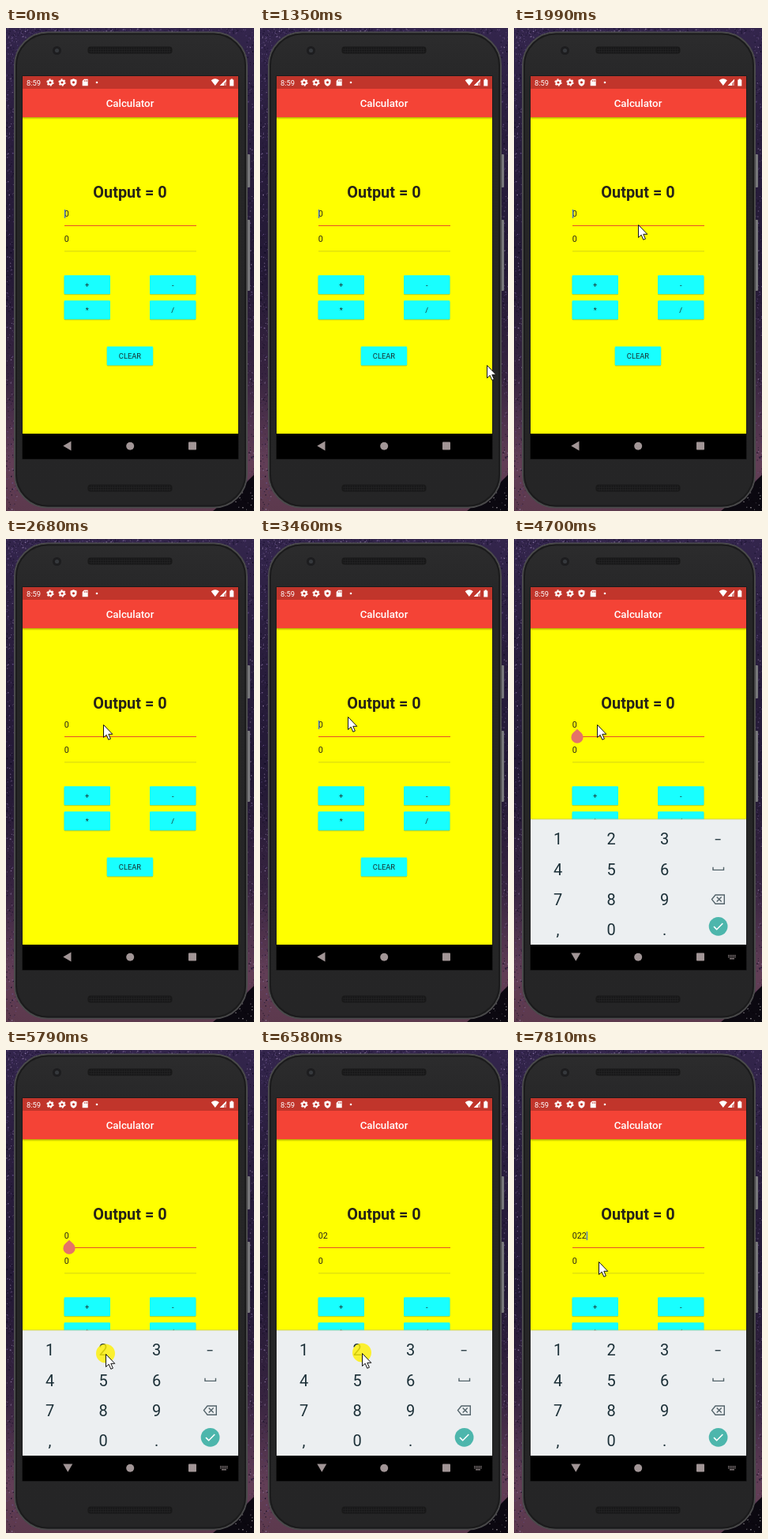
An HTML page that plays this animation: 314x612 px, repeating every 8000 ms.

```html
<!DOCTYPE html>
<html lang="en">
<head>
<meta charset="utf-8">
<title>Calculator</title>
<style>
  html, body { margin: 0; width: 100%; height: 100%; overflow: hidden; background: #241a33; }
  svg { display: block; width: 314px; height: 612px; font-family: Roboto, Arial, sans-serif; }
</style>
</head>
<body>
<svg id="stage" viewBox="0 0 314 612" xmlns="http://www.w3.org/2000/svg"></svg>
<script>
const LOOP = 8000;
const stage = document.getElementById('stage');

let seed = 11;
const random = () => (seed = (seed * 16807) % 2147483647) / 2147483647;

const rect = (x, y, w, h, fill, extra = '') =>
  `<rect x="${x}" y="${y}" width="${w}" height="${h}" fill="${fill}" ${extra}/>`;
const circle = (x, y, r, fill, extra = '') =>
  `<circle cx="${x}" cy="${y}" r="${r}" fill="${fill}" ${extra}/>`;
const path = (d, fill, extra = '') => `<path d="${d}" fill="${fill}" ${extra}/>`;
const line = (d, color, width) => path(d, 'none', `stroke="${color}" stroke-width="${width}"`);
const label = (text, x, y, size, fill, extra = '') =>
  `<text x="${x}" y="${y}" font-size="${size}" fill="${fill}" ${extra}>${text}</text>`;
const centered = 'text-anchor="middle"';

const gradient = (id, stops) =>
  `<linearGradient id="${id}" x1="0" y1="0" x2="0" y2="1">${stops
    .map(([offset, color, opacity = 1]) =>
      `<stop offset="${offset}" stop-color="${color}" stop-opacity="${opacity}"/>`).join('')}</linearGradient>`;

function specks(count, x, y, w, h, tints) {
  let out = '';
  for (let i = 0; i < count; i++) {
    const size = (0.6 + random() * 0.9).toFixed(1);
    out += rect((x + random() * w).toFixed(1), (y + random() * h).toFixed(1), size, size,
      tints[i % tints.length], `opacity="${(0.25 + random() * 0.6).toFixed(2)}"`);
  }
  return out;
}

function sky() {
  const tints = ['#6b5590', '#0e0920', '#9a86ad', '#120c26', '#4a3768'];
  return rect(0, 0, 314, 612, 'url(#sky)') +
    specks(650, 0, 0, 14, 612, tints) + specks(450, 303, 0, 11, 612, tints) +
    specks(350, 14, 0, 289, 7, tints) + specks(150, 0, 0, 45, 40, tints) +
    path('M314 566L300 580 262 612H314Z', '#0b0810') +
    specks(45, 290, 578, 24, 34, ['#d8d2d8', '#0b0810']);
}

function speaker(y) {
  return rect(103.5, y, 107, 9, '#191919', 'rx="3.5"') +
    rect(105, y + 1, 104, 7, 'url(#mesh)', 'rx="3"');
}

function phone() {
  return rect(305, 160, 4, 42, '#77777a', 'rx="1"') +
    rect(305, 243, 4, 90, '#77777a', 'rx="1"') +
    rect(11, 5.5, 294, 602, 'url(#body)', 'rx="42" stroke="#4a4a4b" stroke-width="2"') +
    rect(13, 7.5, 290, 598, 'none', 'rx="40" stroke="#1b1b1c" stroke-width="2"') +
    circle(64.5, 28.5, 5.5, '#1d1d1f') +
    circle(64.5, 28.5, 2.6, '#35383c') +
    speaker(23.5) + speaker(578.5);
}

function gear(x) {
  return circle(x, 69, 2.6, 'none', 'stroke="#fff" stroke-width="2"') +
    circle(x, 69, 4, 'none', 'stroke="#fff" stroke-width="1.3" stroke-dasharray="2.1 2.09"');
}

function statusBar() {
  return rect(21, 61, 273, 16, '#c1352b') +
    label('8:59', 26, 72.6, 9.3, '#fff') +
    gear(56) + gear(71) +
    path('M85.5 64.3l4 1.5v3q0 3.5-4 5q-4-1.5-4-5v-3z', '#fff') +
    circle(85.5, 68.8, 1.6, '#c1352b') +
    path('M99 64.7h4.7v8.6h-7v-6.3z', '#fff') +
    line('M99.3 66v2M101 66v2M102.6 66v2', '#c1352b', 0.7) +
    circle(115, 69, 1.3, '#fff') +
    path('M259.7 66.3q5.1-4 10.2 0l-5.1 6.8z', '#fff') +
    path('M279 64.8v8.3h-8.3z', '#fff', 'fill-opacity=".4"') +
    path('M279 64.8v2.5l-3 3v2.8h-5.3z', '#fff') +
    path('M283.3 65.5h1.4v-1h2.2v1h1.4v8h-5z', '#fff');
}

function button(text, x, y) {
  return rect(x, y + 1, 58.5, 24, '#77811a', 'rx="1.5" opacity=".4"') +
    rect(x, y, 58.5, 24, '#18ffff', 'rx="1.3"') +
    label(text, x + 29.2, y + 15.4, 9.3, '#172a2a', centered);
}

function app() {
  return rect(21, 77, 273, 437, '#ff0') +
    rect(21, 113, 273, 3, 'url(#shade)') +
    rect(21, 77, 273, 36, '#f44336') +
    label('Calculator', 157, 100.3, 13.3, '#fff', `${centered} font-weight="500"`) +
    statusBar() +
    label('Output = 0', 157, 215.3, 19.9, '#262318', `${centered} font-weight="700"`) +
    label('0', 73.8, 239, 10.7, '#262318', 'id="entry"') +
    rect(74, 250, 167, 1, '#e4502a') +
    label('0', 73.8, 271, 10.7, '#262318') +
    rect(74, 282.5, 167, 0.8, '#c9c91a') +
    button('+', 73.5, 313.3) + button('-', 182, 313.3) +
    button('*', 73.5, 345.2) + button('/', 182, 345.2) +
    button('CLEAR', 127.7, 403.5) +
    rect(0, 230, 1.2, 11, '#3566e0', 'id="caret"') +
    path('M80 240.8l5.4 5a7.6 7.6 0 1 1-10.8 0z', '#e57368', 'id="handle"');
}

function keyboard() {
  const ink = '#1c3038';
  const rows = ['123−', '456', '789', ',0.'];
  const keys = rows.map((row, r) => [...row].map((key, c) =>
    label(key, 55.5 + c * 67.6, 387.2 + r * 38.3, key === '−' ? 17 : 20, ink, centered)).join('')).join('');
  return `<g clip-path="url(#screen)"><g id="keyboard">` +
    rect(21, 354.6, 273, 1, '#b9bd80') +
    rect(21, 355.4, 273, 159, '#eceff1') + keys +
    line('M252 415.8v3.6h13.5v-3.6', '#53636a', 1.4) +
    line('M255 451h11.3v11.2H255l-4.5-5.6z', '#53636a', 1.4) +
    line('M256.7 453.6l6 6m0-6l-6 6', '#53636a', 1.4) +
    circle(258.6, 490.8, 11.9, '#4db6ac') +
    line('M253 491l3.7 3.7 7.6-7.7', '#fff', 1.6) +
    `</g></g>`;
}

function navBar() {
  const gray = '#a19596';
  let dots = '';
  for (let i = 0; i < 10; i++) {
    dots += rect(271 + (i % 5) * 2.1, 527 + Math.floor(i / 5) * 2, 1.3, 1.2, gray);
  }
  return rect(21, 514, 273, 32, '#000') +
    path('M72.3 529.6l10.2-6v12z', gray, 'id="back"') +
    `<g id="dismiss">${path('M72.3 524.5h12l-6 10.2z', gray)}${dots}${rect(273, 531.2, 6, 1.2, gray)}</g>` +
    circle(157.2, 529.7, 5, gray) +
    rect(231, 524.5, 10, 10, gray, 'rx=".8"');
}

stage.innerHTML = `<defs>` +
  gradient('sky', [[0, '#33254c'], [0.2, '#2a1e3e'], [0.5, '#231935'], [0.72, '#372440'], [0.9, '#623e56'], [1, '#5c394d']]) +
  gradient('body', [[0, '#2c2c2d'], [0.12, '#262627'], [1, '#252526']]) +
  gradient('shade', [[0, '#5a4a00', 0.45], [1, '#5a4a00', 0]]) +
  `<pattern id="mesh" width="3" height="3" patternUnits="userSpaceOnUse">${rect(0, 0, 3, 3, '#1f1f20')}${circle(1.5, 1.5, 1, '#141415')}</pattern>` +
  `<clipPath id="screen">${rect(21, 61, 273, 453, '#fff')}</clipPath></defs>` +
  sky() + phone() + rect(20.5, 60.5, 274, 486, '#111') + app() + keyboard() + navBar() +
  circle(0, 0, 12, '#fff000', 'id="halo" fill-opacity=".8"') +
  path('M0 0V16L3.7 12.7 6.3 18.8 8.9 17.7 6.3 11.8H11.3Z', '#fff',
    'id="pointer" stroke="#111" stroke-width="1" stroke-linejoin="round"');

const part = Object.fromEntries([...stage.querySelectorAll('[id]')].map(el => [el.id, el]));

// Pointer tip: time, x, y
const route = [
  [70, 268, 481], [110, 287, 427], [1040, 287, 427], [1350, 287, 427], [1440, 281, 402], [1670, 243, 303],
  [1840, 243, 303], [1990, 157, 249], [2220, 157, 249], [2450, 139, 191], [2680, 123, 235],
  [2990, 142, 238], [3060, 142, 238], [3270, 122, 204], [3530, 105, 235], [4940, 105, 235],
  [5090, 123, 385], [5410, 123, 385], [5560, 126, 385], [6060, 126, 385], [6190, 157, 396],
  [6340, 129, 384], [6790, 129, 384], [7050, 108, 286], [7200, 108, 286], [7430, 106, 268],
  [7660, 107, 268], [8000, 107, 268]
];
const caretSpans = [
  [0, 490], [1040, 1500], [1990, 2490], [2990, 3490], [3920, 4320], [4940, 5410],
  [5910, 6490], [6790, 7300], [7810, 8000]
];
const clicks = [[3850, 4090], [5790, 6060], [6490, 6790]];

const within = (spans, t) => spans.some(([from, to]) => t >= from && t < to);
const show = (el, on) => el.setAttribute('visibility', on ? 'visible' : 'hidden');
const move = (el, x, y) => el.setAttribute('transform', `translate(${x} ${y})`);

function pointerAt(t) {
  const i = Math.max(1, route.findIndex(([time]) => time > t));
  const [t0, x0, y0] = route[i - 1];
  const [t1, x1, y1] = route[i];
  if (t1 - t0 < 60) return [x0, y0];
  // The pointer advances in discrete screen updates.
  const steps = Math.max(1, Math.round((t1 - t0) / 75));
  const k = Math.floor((t - t0) / (t1 - t0) * steps) / steps;
  return [Math.round(x0 + (x1 - x0) * k), Math.round(y0 + (y1 - y0) * k)];
}

function draw(t) {
  const [x, y] = pointerAt(t);
  show(part.pointer, t >= 70);
  move(part.pointer, x + 0.5, y + 0.5);
  show(part.halo, within(clicks, t));
  move(part.halo, x, y - 0.5);

  const text = t < 5990 ? '0' : t < 6790 ? '02' : '022';
  part.entry.textContent = text;
  show(part.caret, within(caretSpans, t));
  part.caret.setAttribute('x', t < 4090 ? 74 : 73.8 + 6 * text.length);
  show(part.handle, t >= 4160 && t < 5990);

  const focused = t >= 4240;
  show(part.back, !focused);
  show(part.dismiss, focused);
  show(part.keyboard, t >= 4620);
  move(part.keyboard, 0, t < 4700 ? 70 : 0);
}

const start = performance.now();
function tick() {
  draw((performance.now() - start) % LOOP);
  requestAnimationFrame(tick);
}
draw(0);
requestAnimationFrame(tick);
</script>
</body>
</html>
```
